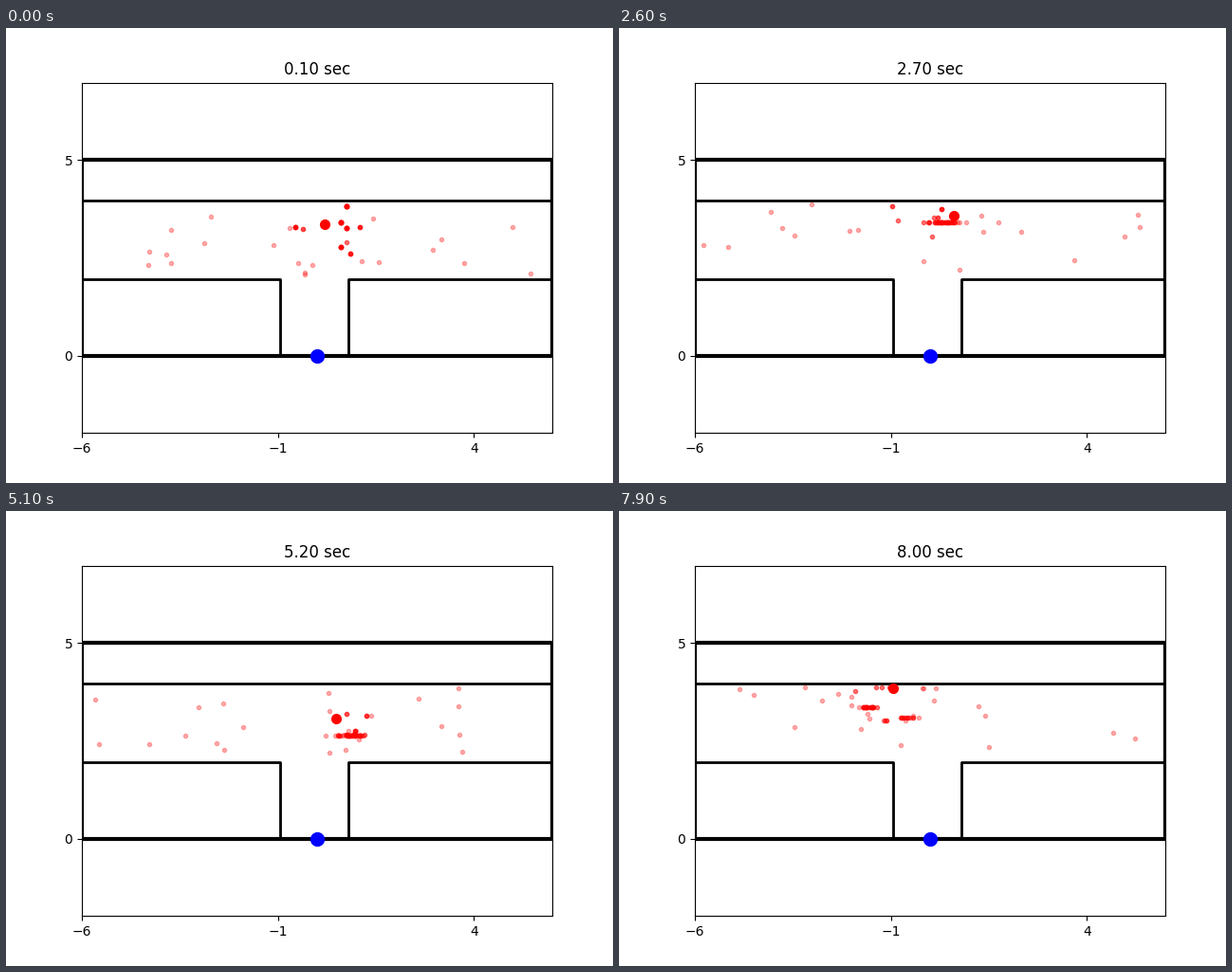
A matplotlib script that plays this animation: 640x480 px, repeating every 8000 ms.

```python
import numpy as np
import matplotlib.pyplot as plt
from matplotlib.animation import FuncAnimation

FRAMES, STEP_MS = 80, 100
KEPT, STRAYS = 80, 18
LOW, HIGH = 2.05, 3.93  # reachable height of the corridor
rng = np.random.default_rng(7)

# Target way-points: step, x, y
WAY = np.array([
    (0, 0.20, 3.35), (19, 0.29, 3.82), (32, 0.85, 3.29), (44, 0.61, 2.61),
    (59, 0.64, 3.33), (71, 1.12, 3.64), (79, -0.94, 3.84),
])


def target_path():
    """Random walk pinned to the way-points."""
    steps = np.arange(FRAMES)
    walk = np.cumsum(rng.normal(0, 0.07, (FRAMES, 2)), axis=0)
    key = WAY[:, 0].astype(int)
    path = [np.interp(steps, key, WAY[:, i + 1])
            + walk[:, i] - np.interp(steps, key, walk[key, i])
            for i in range(2)]
    return np.column_stack([path[0], np.clip(path[1], LOW, 3.88)])


def scatter(n):
    return rng.uniform((-5.9, LOW), (5.9, HIGH), (n, 2))


def particle_filter(path):
    """Jitter sideways, resample near a noisy reading, add fresh strays."""
    cloud, clouds = scatter(KEPT + STRAYS), []
    noise = np.zeros(2)
    for spot in path:
        cloud[:, 0] += rng.normal(0, 0.1, len(cloud))
        miss = (cloud - spot - noise) / (0.55, 0.6)
        weight = np.exp(-(miss ** 2).sum(axis=1) / 2) + 1e-6
        pick = rng.choice(len(cloud), KEPT, p=weight / weight.sum())
        cloud = np.vstack([cloud[pick], scatter(STRAYS)])
        clouds.append(cloud.copy())
        noise = rng.normal(0, (0.7, 0.5))
    return clouds


path = target_path()
clouds = particle_filter(path)

fig, ax = plt.subplots(figsize=(6.4, 4.8), dpi=100)
fig.subplots_adjust(left=0.125, right=0.9, bottom=0.11, top=0.88)
half = 6 * 369.6 / 496  # equal scale on both axes
ax.set_xlim(-6, 6)
ax.set_ylim(2.5 - half, 2.5 + half)
ax.set_xticks([-6, -1, 4])
ax.set_yticks([0, 5])

ax.plot([-6, 6, 6, -6, -6], [0, 0, 5, 5, 0], "k", lw=3)
for xs, ys in [([-6, 6], [3.96, 3.96]),
               ([-6, -0.95, -0.95], [1.96, 1.96, 0]),
               ([6, 0.8, 0.8], [1.96, 1.96, 0])]:
    ax.plot(xs, ys, "k", lw=2)

dots, = ax.plot([], [], "ro", ms=3, alpha=0.3)
target, = ax.plot([], [], "ro", ms=7)
ax.plot(0, 0, "bo", ms=10)
title = ax.set_title("")


def draw(step):
    dots.set_data(*clouds[step].T)
    target.set_data(*path[step:step + 1].T)
    title.set_text(f"{(step + 1) / 10:.2f} sec")
    return dots, target, title


anim = FuncAnimation(fig, draw, frames=FRAMES, interval=STEP_MS,
                     repeat=True, repeat_delay=0)
plt.show()
```
